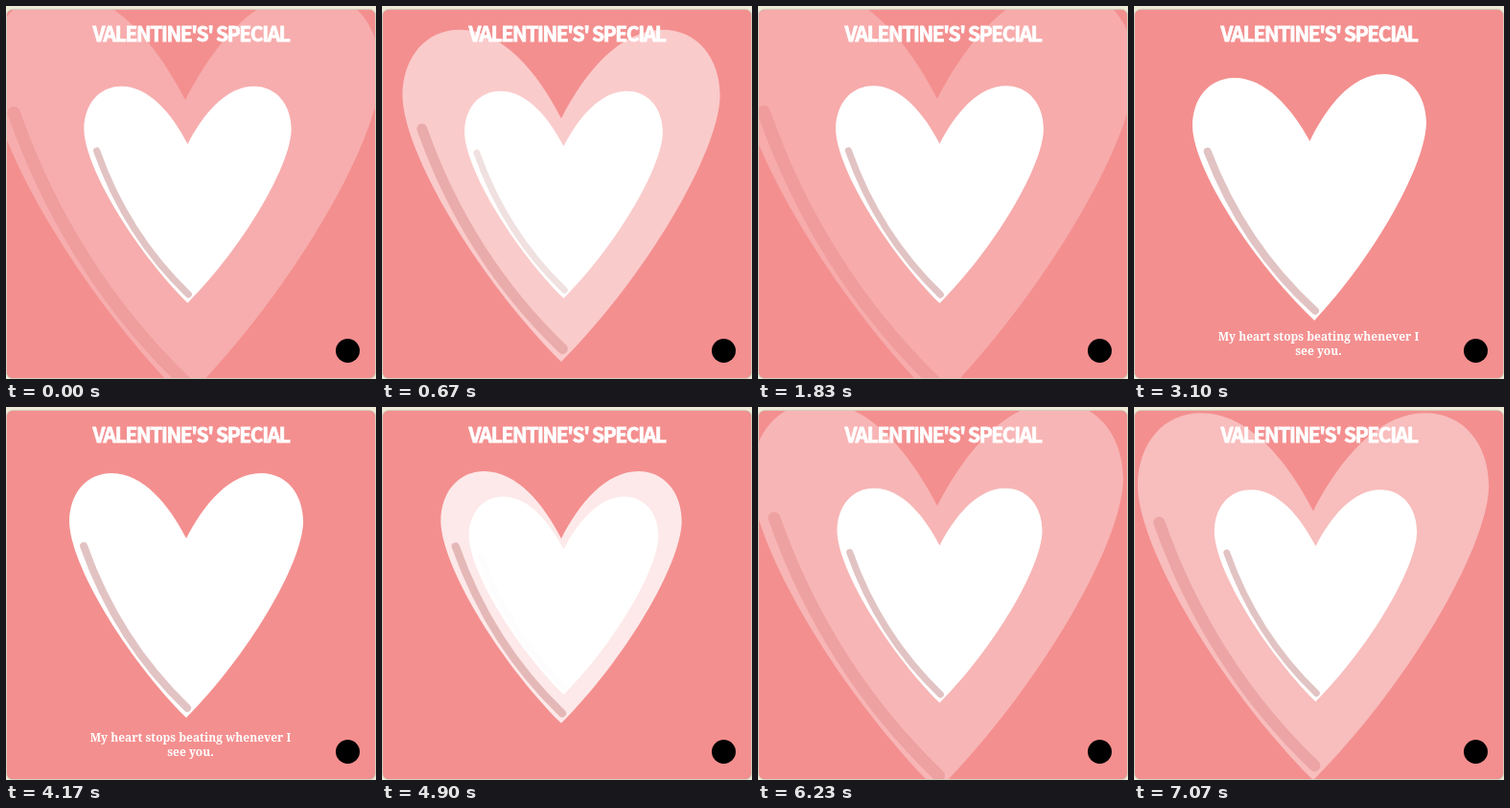
An HTML page with a canvas for the animation above (7.13 s loop, 386 px wide and 389 px high).

```html
<!DOCTYPE html>
<html lang="en">
<head>
<meta charset="utf-8">
<title>Beating heart card</title>
<style>
  html, body { margin: 0; width: 100%; height: 100%; overflow: hidden; background: #f1ecda; }
  .card {
    position: absolute; left: 1px; top: 4px; width: 384px; height: 384px;
    border-radius: 6px; overflow: hidden; background: #f48f8f;
    box-shadow: 0 0 2px rgba(60, 50, 40, .6);
  }
  canvas { position: absolute; left: 0; top: 0; width: 384px; height: 384px; }
  p { position: absolute; margin: 0; color: #fff; text-align: center; white-space: nowrap; }
  .title {
    left: 0; width: 384px; top: 7.5px;
    font: 900 21px/32px "Noto Sans CJK JP", "Noto Sans CJK SC", "Noto Sans CJK", Roboto, sans-serif;
    letter-spacing: -1.4px; -webkit-text-stroke: .8px #fff;
  }
  .note { left: 0; width: 383px; top: 333px; font: 600 12px/15px "Noto Serif", serif; }
  .dot { position: absolute; left: 343px; top: 343px; width: 25px; height: 25px; border-radius: 50%; background: #000; }
</style>
</head>
<body>
<div class="card">
  <canvas id="heart"></canvas>
  <canvas id="echo"></canvas>
  <canvas id="gleam"></canvas>
  <p class="title">VALENTINE'S' SPECIAL</p>
  <p class="note">My heart stops beating whenever I<br>see you.</p>
  <div class="dot"></div>
</div>
<script>
const LOOP = 7130, BEAT = 907, SHAKE = 500;
const STOP = 2700, RESUME = 4727;
const START_PHASE = 0.725;

const note = document.querySelector('.note');
const dpr = window.devicePixelRatio || 1;
const [heart, echo, gleam] = ['heart', 'echo', 'gleam'].map(id => {
  const canvas = document.getElementById(id);
  canvas.width = canvas.height = Math.round(384 * dpr);
  return canvas.getContext('2d');
});

const body = new Path2D(
  'M0-61 C18-96 45-129 78-129 C104-129 122-108 122-78 C121-34 64 62 0 126 ' +
  'C-64 62-121-34-122-78 C-122-108-104-129-78-129 C-45-129-18-96 0-61Z');
const shine = new Path2D('M-107-53 Q-72 46 1 116');

// x, y, degrees
const jolts = [
  [1, 1, 0], [-1, -3, -1], [-4, 0, 1], [4, 3, 0], [1, -1, 1], [-4.5, 4, -1.5],
  [-3, 1, 0], [.75, -1.5, 0], [-1, -1, 1], [1, 3, 0], [1, -3, -1]
];

const frac = v => v - Math.floor(v);
const mix = (a, b, k) => a + (b - a) * k;
const easeInOut = k => k * k * (3 - 2 * k);

function place(ctx, x, y, scale, degrees = 0) {
  ctx.translate(x, y);
  ctx.rotate(degrees * Math.PI / 180);
  ctx.scale(scale, scale);
}

function fillBody(ctx) {
  ctx.fillStyle = '#fff';
  ctx.fill(body);
}

function strokeShine(ctx) {
  ctx.strokeStyle = '#e2c3c3';
  ctx.lineWidth = 8;
  ctx.lineCap = 'round';
  ctx.stroke(shine);
}

function drawBeat(phase) {
  const size = mix(.8, .906, easeInOut(phase));
  place(heart, 189.5, 198, size);
  fillBody(heart);

  place(echo, 187, 200, mix(.8, 2, phase));
  fillBody(echo);
  strokeShine(echo);
  echo.canvas.style.opacity = 1 - phase;

  place(gleam, 189.5, 198, size);
  strokeShine(gleam);
  gleam.canvas.style.opacity = Math.min(1, (phase / .58) ** 3);
}

function drawShake(t) {
  const pos = frac((t - 2850) / SHAKE) * (jolts.length - 1);
  const i = Math.floor(pos);
  const [x, y, turn] = jolts[i].map((v, n) => mix(v, jolts[i + 1][n], pos - i));
  place(heart, 189.5 + x, 198 + y, 1, turn);
  fillBody(heart);
  strokeShine(heart);
}

function render(t) {
  const still = t >= STOP && t < RESUME;
  for (const ctx of [heart, echo, gleam]) {
    ctx.setTransform(dpr, 0, 0, dpr, -dpr, -4 * dpr);
    ctx.clearRect(0, 0, 400, 400);
  }
  if (still) drawShake(t);
  else drawBeat(frac(t < STOP ? START_PHASE + t / BEAT : (t - RESUME) / BEAT));
  note.style.visibility = still ? 'visible' : 'hidden';
}

const begin = performance.now();
function tick() {
  render((performance.now() - begin) % LOOP);
  requestAnimationFrame(tick);
}
tick();
</script>
</body>
</html>
```
